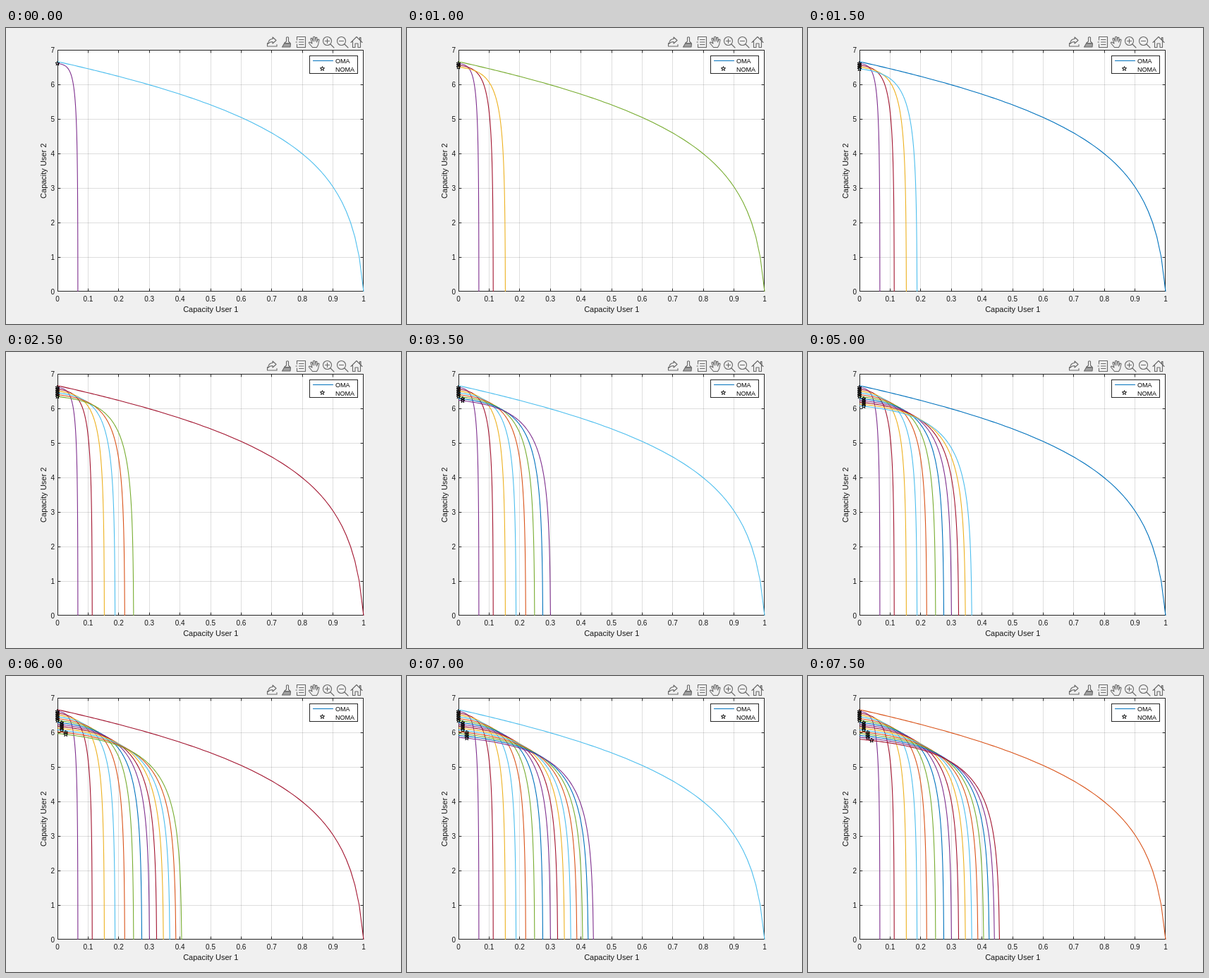
Write an HTML page that moves like this. It is 560 by 420 pixels and loops after 8000 ms.

```html
<!DOCTYPE html>
<html lang="en">
<head>
<meta charset="utf-8">
<title>Capacity regions</title>
<style>
  html, body { margin: 0; width: 100%; height: 100%; overflow: hidden; background: #f0f0f0; }
  svg { display: block; width: 560px; height: 420px; }
  text { font-family: "Liberation Sans", Arial, sans-serif; fill: #161616; }
  .tick { font-size: 10px; }
  .label { font-size: 11px; }
  .key { font-size: 9px; fill: #000; }
  .mid { text-anchor: middle; }
  .end { text-anchor: end; }
  .icons { fill: none; stroke: #686868; stroke-width: 1.1; stroke-linejoin: round; stroke-linecap: round; }
  .curve { fill: none; stroke-width: 1.1; stroke-linejoin: round; }
  .star { fill: none; stroke: #000; stroke-width: 1; }
</style>
</head>
<body>
<svg viewBox="0 0 560 420">
  <rect width="560" height="420" fill="#f0f0f0"/>
  <rect x="73" y="31" width="434" height="343" fill="#fff"/>
  <g id="axes"></g>
  <text class="label mid" x="290.3" y="402.5">Capacity User 1</text>
  <text class="label mid" transform="translate(56.5 202.8) rotate(-90)">Capacity User 2</text>
  <g id="data"></g>

  <rect x="430.5" y="39.5" width="68" height="25" fill="#fff" stroke="#262626"/>
  <path d="M435 46.5H464" stroke="#0072bd"/>
  <text class="key" x="467" y="50">OMA</text>
  <text class="key" x="467" y="62">NOMA</text>
  <g id="key"></g>

  <g class="icons">
    <path d="M370.500 21.500V26H384V23.500M371.500 22.500C372 17.500 375 15.500 378 15.500V13L383 17.500L378 22V19.500C375 19.500 373 20.500 371.500 22.500"/>
    <path d="M397.500 13.500Q399 12 400.500 13.500V19L403 21.500H394.500L397.500 19Z"/>
    <path d="M394.500 22L391.500 27H403L403.500 22Z" fill="#a0a0a0"/>
    <path d="M412.500 17V12.500H424.500V27.500H412.500V23M411 20H412.500M415.500 16.500H422M415.500 20H422M415.500 23.500H422"/>
    <path d="M434.500 27.500L429.500 21.500Q429 19.500 431.500 20.500L434 22L432 15.500Q432.500 13.500 434 15L435.500 19V13Q436.700 11.500 438 13V19L439 14Q440.500 12.500 441 14.500L440.500 20L442 16.500Q443.500 15.500 444 17L442.500 24L440.500 27.500Z"/>
    <circle cx="455.500" cy="18.500" r="6"/>
    <path d="M460 23L465 28M452.500 18.500H458.500M455.500 15.500V21.500"/>
    <circle cx="475.500" cy="18.500" r="6"/>
    <path d="M480 23L485 28M472.500 18.500H478.500"/>
    <path d="M489 20.500L497 12.500L505 20.500M491.500 18.500V27.500H495V22H499V27.500H502.500V18.500M501.500 16.500V13.500H503V18"/>
  </g>
</svg>
<script>
  const COLORS = ["#0072bd", "#d95319", "#edb120", "#7e2f8e", "#77ac30", "#4dbeee", "#a2142f"];
  const STEP = 500, COUNT = 16, SNR = 100, TICK = 3.84;
  const LEFT = 73, RIGHT = 507, TOP = 31, BOTTOM = 374;
  const px = x => LEFT + x * (RIGHT - LEFT);
  const py = y => BOTTOM - y * (BOTTOM - TOP) / 7;
  const byId = id => document.getElementById(id);
  const powers = Array.from({ length: 101 }, (_, i) => i / 100);

  function add(parent, tag, attrs, text) {
    const el = document.createElementNS("http://www.w3.org/2000/svg", tag);
    for (const name in attrs) el.setAttribute(name, attrs[name]);
    if (text !== undefined) el.textContent = text;
    return parent.appendChild(el);
  }

  function drawAxes() {
    const g = byId("axes");
    // Centre of the pixel at v, kept inside the plot area
    const snap = (v, limit) => Math.min(Math.floor(v + 1e-6), limit - 1) + 0.5;
    const x0 = snap(LEFT, RIGHT), x1 = snap(RIGHT, RIGHT);
    const y0 = snap(TOP, BOTTOM), y1 = snap(BOTTOM, BOTTOM);
    let grid = "", ticks = "";
    for (let i = 0; i <= 10; i++) {
      const x = snap(px(i / 10), RIGHT);
      if (i % 10) grid += `M${x} ${y0}V${y1}`;
      ticks += `M${x} ${y0}v${TICK}M${x} ${y1}v${-TICK}`;
      add(g, "text", { class: "tick mid", x: px(i / 10), y: 388 }, i / 10);
    }
    for (let i = 0; i <= 7; i++) {
      const y = snap(py(i), BOTTOM);
      if (i % 7) grid += `M${x0} ${y}H${x1}`;
      ticks += `M${x0} ${y}h${TICK}M${x1} ${y}h${-TICK}`;
      add(g, "text", { class: "tick end", x: 69, y: py(i) + 4 }, i);
    }
    add(g, "path", { d: grid, stroke: "#262626", "stroke-opacity": 0.15 });
    add(g, "path", { d: `${ticks}M${x0} ${y0}H${x1}V${y1}H${x0}Z`, fill: "none", stroke: "#262626" });
  }

  function addCurve(parent, points, color) {
    const list = points.map(([x, y]) => px(x).toFixed(2) + "," + py(y).toFixed(2)).join(" ");
    return add(parent, "polyline", { class: "curve", points: list, stroke: COLORS[color % 7] });
  }

  function addStar(parent, cx, cy) {
    const points = Array.from({ length: 10 }, (_, i) => {
      const r = i % 2 ? 1.3 : 3.2, a = i * Math.PI / 5;
      return (cx + r * Math.sin(a)).toFixed(2) + "," + (cy - r * Math.cos(a)).toFixed(2);
    });
    add(parent, "polygon", { class: "star", points: points.join(" ") });
  }

  // Both users' rates when user 1 holds a share of the band and power p
  const split = share => powers.map(p => [
    share * Math.log2(1 + p / share),
    (1 - share) * Math.log2(1 + SNR * (1 - p) / (1 - share))
  ]);
  const outer = powers.map(p => [Math.log2(2 / (1 + p)), Math.log2(1 + SNR * p)]);

  drawAxes();
  addStar(byId("key"), 448.5, 57.8);

  const data = byId("data");
  const groups = [];
  for (let k = 0; k < COUNT; k++) {
    const g = add(data, "g", {});
    const points = split((k + 1) / 100);
    const best = points.reduce((a, b) => b[0] + b[1] > a[0] + a[1] ? b : a);
    addCurve(g, points, 3 + 3 * k);
    addStar(g, px(best[0]), py(best[1]));
    groups.push(g);
  }
  const edge = addCurve(data, outer, 5);

  const start = performance.now();
  function draw() {
    const k = Math.floor((performance.now() - start) / STEP) % COUNT;
    groups.forEach((g, i) => g.setAttribute("visibility", i <= k ? "visible" : "hidden"));
    edge.setAttribute("stroke", COLORS[(5 + 3 * k) % 7]);
    requestAnimationFrame(draw);
  }
  draw();
</script>
</body>
</html>
```
